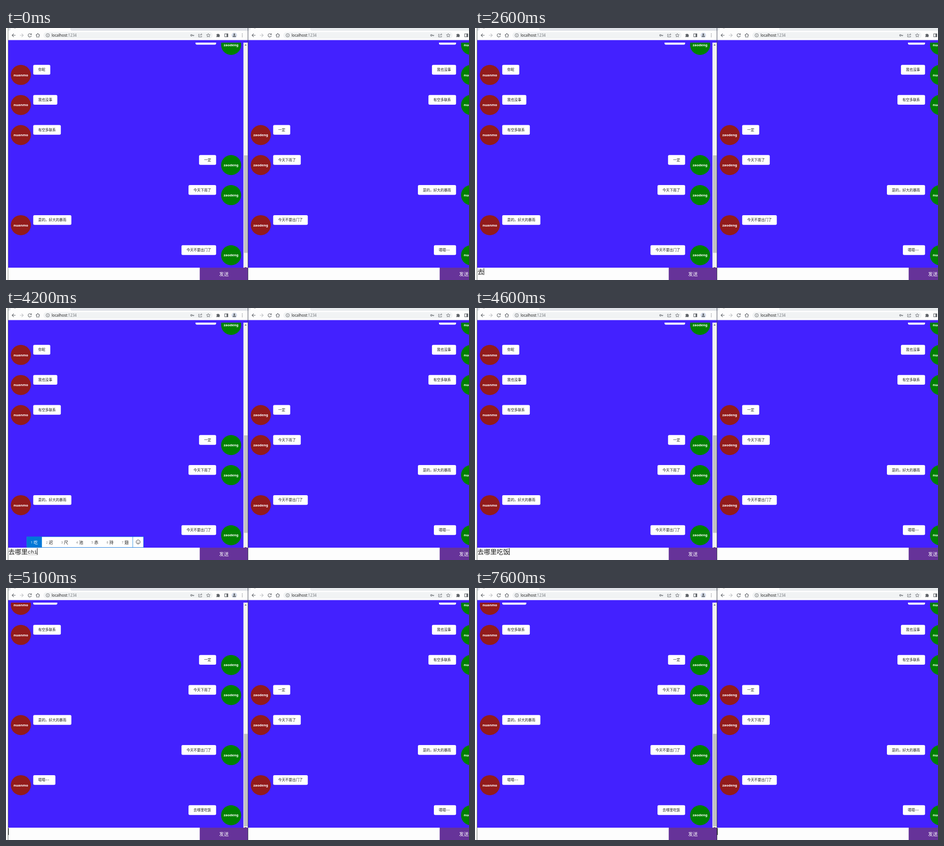
An HTML page that plays this animation: 1015x552 px, repeating every 8 s.

```html
<!DOCTYPE html>
<html>
<head>
<meta charset="utf-8">
<title>Chat</title>
<style>
  html, body { margin: 0; width: 100%; height: 100%; overflow: hidden; background: #fdfdfd; }
  svg { display: block; width: 1015px; height: 552px; }
  text { font: 7.7px "Noto Sans", "Noto Sans CJK SC", sans-serif; fill: #1c1c1c; white-space: pre; }
  .name { font-weight: 700; fill: #fff; text-anchor: middle; }
  .send { font-size: 10.4px; fill: #fff; text-anchor: middle; }
  .url { font-size: 8.1px; }
  .field { font: 300 14px "Noto Sans CJK SC", sans-serif; }
  .pinyin { font: 11.67px "Liberation Mono", monospace; }
  .num { font-size: 6.2px; fill: #777; }
  .word { font-size: 9.2px; }
  .first { fill: #fff; }
  .icons { fill: none; stroke: #5f6368; stroke-width: 1.1; }
  .solid { fill: #5f6368; stroke: none; }
</style>
</head>
<body>
<svg viewBox="0 0 1015 552">
  <defs>
    <clipPath id="frame"><rect x="5" y="0" width="525.5" height="552"/></clipPath>
    <clipPath id="list"><rect x="5" y="32" width="525.5" height="493"/></clipPath>
    <g id="bar">
      <rect x="5" y="0" width="526" height="27" fill="#fdfdfd"/>
      <path d="M141 0H531V6H145Q141 6 141 2ZM5 0H10V2Q10 6 5 6Z"/>
      <path d="M17 0H22Q19.500 1.200 17 0Z" fill="#666"/>
      <rect x="82" y="9" width="371" height="14" rx="7" fill="#f1f3f4"/>
      <g class="icons">
        <path d="M21 16H13.500M17 12.300L13.300 16L17 19.700"/>
        <path d="M30.500 16H38M34.300 12.300L38 16L34.300 19.700" stroke="#bcbec1"/>
        <path d="M55 13.500A3.700 3.700 0 1 0 55.700 17M55.700 11.800V14.500H53"/>
        <path d="M65.500 16L69.700 12L74 16M67 15V19.700H72.500V15"/>
        <circle cx="91.500" cy="16" r="3.700" stroke-width=".9"/>
        <path d="M91.500 15.500V18M91.500 13.700V14.600" stroke-width=".9"/>
        <circle cx="406.500" cy="16" r="1.700"/>
        <path d="M408.300 16H412.500M411 16V18"/>
        <path d="M424 13.500H422.300V19.500H429V17.500M424.300 17Q425 14 429 14M427.500 12L429.700 14L427.500 16" stroke-width=".9"/>
        <path d="M443.500 12L444.700 14.600L447.500 14.900L445.400 16.800L446 19.600L443.500 18.200L441 19.600L441.600 16.800L439.500 14.900L442.300 14.600Z" stroke-width=".9"/>
        <path class="solid" d="M461.500 13.500H463.500A1.300 1.300 0 0 1 466 13.500H468V15.500A1.300 1.300 0 0 1 468 18V20H465.700A1.200 1.200 0 0 0 463.400 20H461.500V17.700A1.200 1.200 0 0 0 461.500 15.400Z"/>
        <rect x="479.500" y="12.800" width="7" height="6.500"/>
        <path class="solid" d="M483.500 12.500H487V19.500H483.500Z"/>
        <circle cx="500.500" cy="16" r="6" fill="#d5dcea" stroke="none"/>
        <circle class="solid" cx="500.500" cy="14" r="1.900"/>
        <path class="solid" d="M496.800 19.300Q497 16.600 500.500 16.600T504.200 19.300Z"/>
        <path d="M518 12.300V13.600M518 15.400V16.700M518 18.500V19.800" stroke-width="1.400"/>
      </g>
      <text class="url" x="100" y="18.900">localhost<tspan fill="#70757a">:1234</tspan></text>
    </g>
    <g id="page">
      <rect x="5" y="26.500" width="526" height="499" fill="#4321ff"/>
      <rect x="5" y="525" width="526" height="27" fill="#fdfdfd"/>
      <rect x="424.700" y="525" width="106" height="27" fill="#663399"/>
      <text class="send" x="477.700" y="542.800">发送</text>
    </g>
  </defs>
  <g clip-path="url(#frame)">
    <use href="#bar" fill="#dee1e6"/>
    <use href="#page"/>
    <g clip-path="url(#list)">
      <g id="left"></g>
      <rect x="520.500" y="32" width="10" height="493" fill="#f1f1f1"/>
      <path d="M523 38.300H527.600L525.300 35.700ZM523 524H527.600L525.300 526.600Z" fill="#505050"/>
      <rect id="thumb" x="521.800" width="8" fill="#c1c1c1"/>
    </g>
  </g>
  <rect id="edge" x="4" y="0" width="1" height="552"/>
  <g transform="translate(526)">
    <g clip-path="url(#frame)">
      <use href="#bar" fill="#e7eaed"/>
      <use href="#page"/>
      <g id="right" clip-path="url(#list)"></g>
    </g>
  </g>
  <rect id="seam" x="530" y="0" width="1" height="552"/>
  <g id="input"></g>
</svg>
<script>
const $ = id => document.getElementById(id);
const LOOP = 8000, ROW = 65.82, FONT = 7.7;
const [ANN, BEN] = ['nuanmo', 'zaodeng'];

// [text, sent by BEN]
const chat = [
  ['没事啊', 1], ['你呢', 0], ['我也没事', 0], ['有空多联系', 0], ['一定', 1],
  ['今天下雨了', 1], ['是的，好大的暴雨', 0], ['今天不要出门了', 1],
  ['嗯嗯~~', 0], ['去哪里吃饭', 1]
];

const words = {
  qu: '去 取 区 曲 去年 趣',
  n: '你 那 呢 能 年 女 拿',
  na: '那 拿 哪 呐 纳 娜 钠',
  "na'l": '哪里 那里 那来 拿来 哪两 那辆 拿了',
  "na'li": '哪里 那里 纳里 那离 娜丽 那 拿',
  c: '从 才 次 吃 出 此 查',
  chi: '吃 迟 尺 池 赤 持 翅',
  "chi'f": '吃饭 吃饭了 吃饭吧 吃饭没 吃饭去 吃饭时间',
  "chi'fa": '吃法 吃饭 池 吃 迟 尺',
  "chi'fan": '吃饭 吃饭了 迟 吃 尺 池'
};

// [time, committed text, pinyin, caret: 0 none, 1 left, 2 right]
const steps = [
  [0, '', '', 0], [1300, '', '', 1], [1800, '', '', 0], [2300, '', '', 1],
  [2500, '', 'qu', 1], [2600, '去', '', 1],
  [3000, '去', 'n', 1], [3200, '去', 'na', 1], [3300, '去', "na'l", 1],
  [3500, '去', "na'li", 1], [3900, '去哪里', '', 1],
  [4100, '去哪里', 'c', 1], [4200, '去哪里', 'chi', 1], [4300, '去哪里', "chi'f", 1],
  [4400, '去哪里', "chi'fa", 1], [4500, '去哪里', "chi'fan", 1], [4600, '去哪里吃饭', '', 1],
  [5000, '', '', 1], [5500, '', '', 0], [5900, '', '', 1], [6400, '', '', 0],
  [6600, '', '', 2], [7100, '', '', 0], [7600, '', '', 2]
];

const rect = (x, y, w, h, fill, more = '') =>
  `<rect x="${x}" y="${y}" width="${w}" height="${h}" fill="${fill}" ${more}/>`;
const text = (x, y, cls, s) => `<text x="${x}" y="${y}" class="${cls}">${s}</text>`;

function message(s, mine, name, i) {
  const cy = 37 + ROW * i, top = cy - 22;
  const w = 22 + [...s].reduce((sum, c) => sum + (c === '~' ? 5.6 : FONT), 0);
  const x = mine ? 460.6 - w : 59.7, cx = mine ? 493.5 : 32.5;
  return `<circle cx="${cx}" cy="${cy}" r="22" fill="${mine ? '#008000' : '#921b1b'}"/>` +
    text(cx, cy + 2.7, 'name', name) +
    rect(x, top, w, 21.4, '#fff', 'rx="3"') +
    text(x + 11, top + 13.5, '', s);
}

const view = (rows, owner) => rows.map(([s, ben], i) =>
  message(s, ben === owner, ben ? BEN : ANN, i)).join('');

function picker(x, list) {
  const items = list.split(' ');
  let end = x, cells = '';
  items.forEach((s, i) => {
    const w = 24 + 9.2 * s.length;
    const first = i ? '' : ' first';
    if (!i) cells += rect(x, 501, w, 23.5, '#0078d7');
    cells += text(end + 9, 516, 'num' + first, i + 1) + text(end + 15, 516.5, 'word' + first, s);
    end += w;
  });
  const cx = end + 11.8;
  return rect(x, 501, end - x + 23.5, 23.5, '#fff', 'stroke="#0078d7" stroke-width=".8"') + cells +
    `<path d="M${end} 501V524.500" stroke="#0078d7" stroke-width=".8"/>` +
    `<g fill="none" stroke="#333" stroke-width=".9"><circle cx="${cx}" cy="512.500" r="4.500"/>` +
    `<path d="M${cx - 2.3} 513.500Q${cx} 516.800 ${cx + 2.3} 513.500M${cx - 1.6} 510.500v1.200M${cx + 1.6} 510.500v1.200"/></g>`;
}

function drawInput(done, pinyin, caret) {
  const start = 5.5 + 14 * done.length, end = start + 7 * pinyin.length;
  let out = text(5.5, 538.7, 'field', done);
  if (pinyin) {
    out += text(start, 538, 'pinyin', pinyin) +
      `<path d="M${start} 540.500H${end}" stroke="#444" stroke-width=".7" stroke-dasharray="1 1"/>` +
      picker(Math.max(5.4, start - 2), words[pinyin]);
  }
  if (caret === 1) out += rect(Math.floor(end), 526, 1, 15, '#111');
  if (caret === 2) out += rect(531, 526, 1, 15, '#111');
  return out;
}

let shown = -1;
function show(n) {
  const [time, done, pinyin, caret] = steps[n];
  const sent = time >= 5100;
  $('left').innerHTML = view(sent ? chat.slice(2) : chat.slice(0, 8), 1);
  $('thumb').setAttribute('y', sent ? 319.5 : 279);
  $('thumb').setAttribute('height', sent ? 202.5 : 213.5);
  $('edge').setAttribute('fill', time < 1300 ? '#8b9184' : '#66706a');
  $('seam').setAttribute('fill', time < 6600 ? '#3d4354' : '#30343f');
  $('input').innerHTML = drawInput(done, pinyin, caret);
}

// The send lands one tick after the field empties.
steps.splice(steps.findIndex(s => s[0] === 5500), 0, [5100, '', '', 1]);
$('right').innerHTML = view(chat.slice(1, 9), 0);

function tick() {
  const t = performance.now() % LOOP;
  const n = steps.findLastIndex(s => s[0] <= t);
  if (n !== shown) show(shown = n);
  requestAnimationFrame(tick);
}
tick();
</script>
</body>
</html>
```
